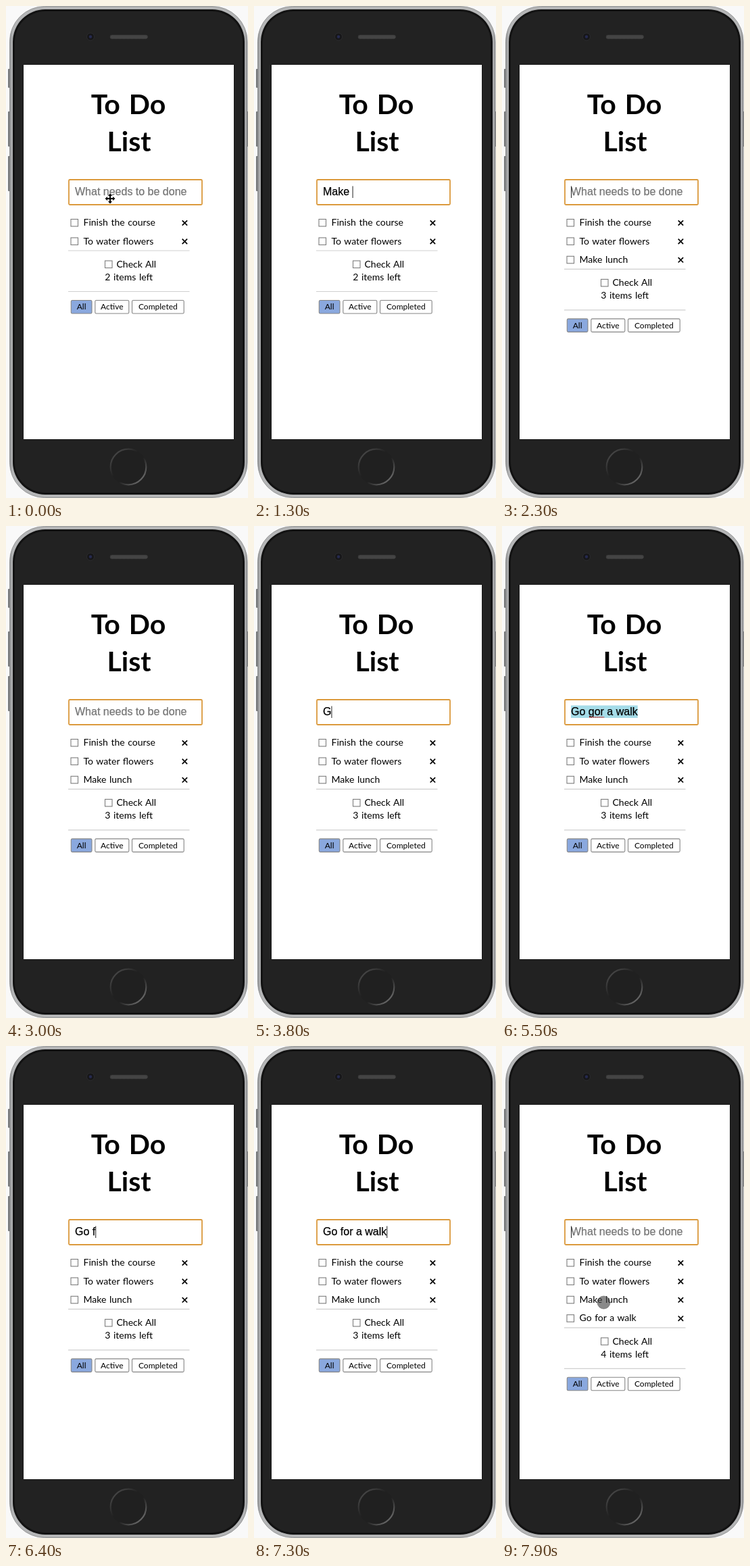
Write an HTML page that moves like this. It is 358x728 px and loops after 8 s.

```html
<!DOCTYPE html>
<html lang="en">
<head>
<meta charset="utf-8">
<title>To Do List</title>
<style>
  html, body { margin: 0; width: 100%; height: 100%; overflow: hidden; background: #f9f9f9; }
  svg { display: block; width: 358px; height: 728px; }
  text { white-space: pre; }
  .ui { font: 14px Lato, "Open Sans", sans-serif; word-spacing: 1px; fill: #000; }
  .title { font: 700 41px Lato, "Open Sans", sans-serif; text-anchor: middle; word-spacing: 3px; }
  .small { font-size: 12px; text-anchor: middle; }
  .field { font: 16px "Liberation Sans", Arial, sans-serif; fill: #000; stroke: #000; stroke-width: .25; }
  .hint { fill: #757575; stroke: #757575; }
  .box { fill: #fff; stroke: #7d7d7d; stroke-width: 1.1; }
  .rule { stroke: #cfcfcf; stroke-width: 1.2; }
  .cross { stroke: #000; stroke-width: 1.7; }
</style>
</head>
<body>
<svg viewBox="0 0 358 728">
  <defs>
    <linearGradient id="shell" x1="0" x2="1" y1="0" y2="0">
      <stop offset="0" stop-color="#8f9092"/>
      <stop offset=".012" stop-color="#b4b5b6"/>
      <stop offset=".988" stop-color="#b4b5b6"/>
      <stop offset="1" stop-color="#8f9092"/>
    </linearGradient>
    <linearGradient id="ring" x1="0" x2="1" y1="0" y2="1">
      <stop offset=".08" stop-color="#4c4c4c"/>
      <stop offset=".42" stop-color="#202020"/>
      <stop offset=".58" stop-color="#202020"/>
      <stop offset=".92" stop-color="#747474"/>
    </linearGradient>
    <pattern id="mesh" width="2" height="2" patternUnits="userSpaceOnUse">
      <rect width="2" height="2" fill="#303030"/>
      <rect width="1" height="1" fill="#585858"/>
      <rect x="1" y="1" width="1" height="1" fill="#585858"/>
    </pattern>
  </defs>

  <rect width="358" height="728" fill="#f9f9f9"/>
  <g fill="#77797b">
    <rect x="3" y="93" width="4" height="28" rx="1"/>
    <rect x="3" y="156" width="4" height="52" rx="1"/>
    <rect x="3" y="222" width="4" height="52" rx="1"/>
    <rect x="356" y="156" width="3" height="52" rx="1"/>
  </g>
  <rect x="5.5" y=".5" width="351.5" height="727" rx="52" fill="url(#shell)" stroke="#88898a" stroke-width=".8"/>
  <rect x="10" y="5" width="343" height="718" rx="48" fill="#121212"/>
  <rect x="13" y="8" width="337" height="712" rx="45" fill="#222"/>
  <circle cx="125" cy="45.5" r="5.5" fill="#171719" stroke="#303033" stroke-width=".8"/>
  <circle cx="125" cy="45.5" r="2.2" fill="#262a50"/>
  <rect x="154" y="43" width="55.5" height="5.5" rx="2.7" fill="url(#mesh)" stroke="#3c3c3c" stroke-width=".6"/>
  <circle cx="181" cy="682" r="26.3" fill="#202020" stroke="url(#ring)" stroke-width="2.2"/>
  <rect x="25.5" y="86.5" width="312" height="555" fill="#0c0c0c"/>
  <rect x="26" y="87" width="311" height="554" fill="#fff"/>

  <text class="title" x="181" y="160">To Do</text>
  <text class="title" x="182" y="215">List</text>

  <rect x="93" y="257" width="197" height="37" rx="1.5" fill="#fff" stroke="#db9a3d" stroke-width="1.8"/>
  <rect id="mark" x="102" y="265.5" width="98.7" height="18.5" fill="#a5dce8"/>
  <text id="typed" class="field" x="102" y="280"></text>
  <text id="hint" class="field hint" x="102" y="280">What needs to be done</text>
  <path id="squiggle" d="M129 282.8H151" stroke="#c8322e" stroke-width="1.8" stroke-dasharray="1.8 1.2"/>
  <rect id="caret" y="266.5" width="1" height="17.5" fill="#222"/>

  <g id="list"></g>
  <g id="footer">
    <path class="rule" d="M92 362H271.5M92 422.5H271.5"/>
    <rect class="box" x="146.5" y="377" width="10.5" height="10.5"/>
    <text class="ui" x="163.5" y="387">Check All</text>
    <text id="left" class="ui" x="181.7" y="406" text-anchor="middle"></text>
    <g id="filters"></g>
  </g>

  <path id="move" fill="#000" stroke="#fff" stroke-width="1" paint-order="stroke"
    d="M0 -7.5L3 -4H1V-1H4V-3L7.5 0L4 3V1H1V4H3L0 7.5L-3 4H-1V1H-4V3L-7.5 0L-4 -3V-1H-1V-4H-3Z"/>
  <circle id="touch" r="9.5" fill="#404040" fill-opacity=".62" stroke="#555" stroke-opacity=".5"/>
</svg>

<script>
const LOOP = 8000;
const ROW = 27.4;
const $ = id => document.getElementById(id);
const clamp = v => Math.max(0, Math.min(1, v));
const within = (t, a, b) => t >= a && t < b;
const show = (el, on) => el.setAttribute("visibility", on ? "visible" : "hidden");
const place = (el, x, y) => el.setAttribute("transform", `translate(${x} ${y})`);

const tasks = ["Finish the course", "To water flowers", "Make lunch", "Go for a walk"];
const added = [0, 0, 2200, 7400];

// Each entry: time, then the field's content from that moment on.
const typing = [
  [0, ""], [1000, "M"], [1100, "Ma"], [1200, "Make"], [1300, "Make "],
  [1500, "Make l"], [1600, "Make lu"], [1800, "Make lun"], [1900, "Make lunc"],
  [2000, "Make lunch"], [2200, ""],
  [3800, "G"], [3900, "Go"], [4000, "Go "], [4100, "Go g"], [4200, "Go go"],
  [4300, "Go gor"], [4400, "Go gor "], [4500, "Go gor a"], [4600, "Go gor a w"],
  [4700, "Go gor a wa"], [4800, "Go gor a walk"],
  [5900, "G"], [6000, "Go"], [6200, "Go "], [6400, "Go f"], [6600, "Go fo"],
  [6700, "Go for"], [6800, "Go for "], [6900, "Go for a"], [7000, "Go for a "],
  [7100, "Go for a w"], [7200, "Go for a wal"], [7300, "Go for a walk"], [7400, ""]
];
const caretOff = [[0, 300], [800, 1000], [2700, 3200], [3700, 3800], [5000, 5900]];

$("list").innerHTML = tasks.map((task, i) => `
  <g transform="translate(0 ${i * ROW})">
    <rect class="box" x="96" y="315.5" width="10.5" height="10.5"/>
    <text class="ui" x="114.5" y="325.3">${task}</text>
    <path class="cross" d="M260.7 317.3L268.1 324.7M268.1 317.3L260.7 324.7"/>
  </g>`).join("");
const rows = [...$("list").children];

const button = (label, x, width, fill) => `
  <rect x="${x}" y="435.5" width="${width}" height="19.5" rx="1.8" fill="${fill}" stroke="#858585" stroke-width="1.1"/>
  <text class="ui small" x="${x + width / 2}" y="449.3">${label}</text>`;
$("filters").innerHTML = button("All", 96.3, 30.7, "#8aa8de")
  + button("Active", 131.8, 50, "#fff") + button("Completed", 186.5, 76.7, "#fff");

const pen = document.createElement("canvas").getContext("2d");
pen.font = '16px "Liberation Sans", Arial, sans-serif';

function draw(t) {
  const text = typing.filter(([at]) => at <= t).pop()[1];
  $("typed").textContent = text;
  show($("hint"), !text);

  const selected = within(t, 5200, 5900);
  show($("mark"), selected);
  show($("squiggle"), within(t, 4400, 5900));
  show($("caret"), !caretOff.some(([a, b]) => within(t, a, b)));
  $("caret").setAttribute("x", 102 + pen.measureText(text).width);

  const count = added.filter(at => at <= t).length;
  rows.forEach((row, i) => show(row, i < count));
  place($("footer"), 0, (count - 2) * ROW);
  $("left").textContent = count + " items left";

  const away = clamp((t - 60) / 540);
  show($("move"), away < 1);
  place($("move"), 154 + 214 * away, 285 + 53 * away);

  const back = 1 - (1 - clamp((t - 7500) / 400)) ** 2;
  show($("touch"), t >= 7500);
  place($("touch"), 168 - 17.5 * back, 452 - 72.5 * back);
}

const start = performance.now();
function tick() {
  draw((performance.now() - start) % LOOP);
  requestAnimationFrame(tick);
}
draw(0);
requestAnimationFrame(tick);
</script>
</body>
</html>
```
